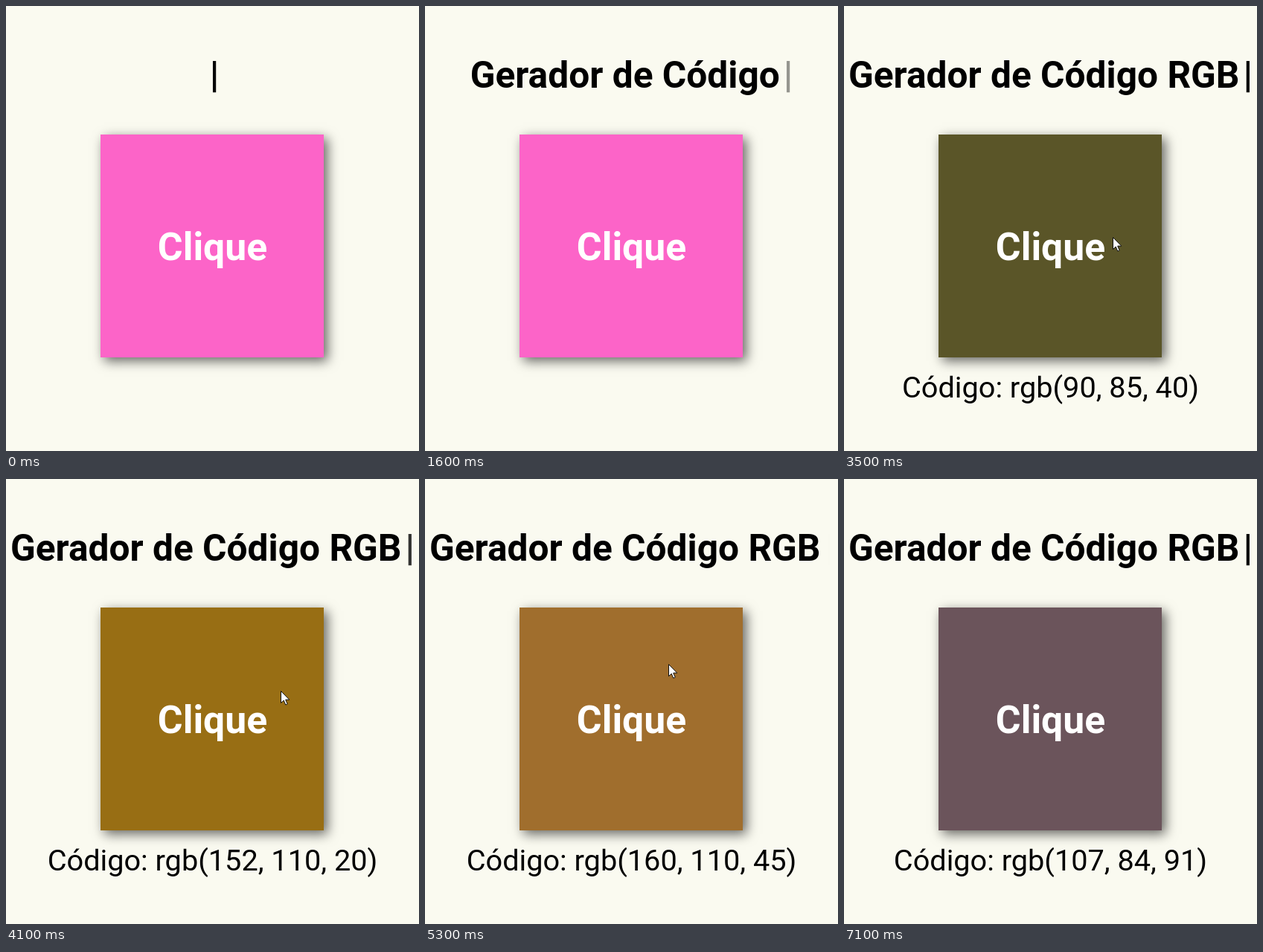
These frames come from a looping animation (555 by 599 pixels, 7.2 s). An HTML page with a canvas:

```html
<!DOCTYPE html>
<html lang="pt">
<head>
<meta charset="utf-8">
<style>
  html, body { margin: 0; width: 100%; height: 100%; overflow: hidden; background: #fafaf0; }
  canvas { display: block; }
</style>
</head>
<body>
<canvas id="stage" width="555" height="599"></canvas>
<script>
const ctx = document.getElementById('stage').getContext('2d');
const LOOP = 7200, MID = 277.5;
const BLINK = 700, TYPE_START = 360, TYPE_STEP = 72;
const FIRST_CLICK = 2500, CLICK_STEP = 500;
const TITLE = 'Gerador de Código RGB';
const FONT = 'px Roboto, sans-serif';

// Every second click shows one of these; the clicks between show the mean of its neighbours.
const COLORS = [[224, 34, 200], [90, 85, 40], [214, 136, 0], [107, 84, 91]];

// The pointer rests at each stop, then glides to the next, one stop per second.
const STOPS = [[-20, 494], [301, 388], [361, 311], [381, 247], [315, 249], [52, -24]];

const clamp = (v, lo, hi) => Math.max(lo, Math.min(hi, v));
const smooth = u => u * u * (3 - 2 * u);

// cubic-bezier(.25, .1, .25, 1), the CSS "ease"
function ease(x) {
  const curve = (s, a, b) => 3 * s * (1 - s) * (1 - s) * a + 3 * s * s * (1 - s) * b + s * s * s;
  let lo = 0, hi = 1;
  for (let i = 0; i < 20; i++) {
    const m = (lo + hi) / 2;
    if (curve(m, .25, .25) < x) lo = m; else hi = m;
  }
  return curve(lo, .1, 1);
}

function caretAlpha(t) {
  const p = 2 * ((t - 80 + BLINK) % BLINK) / BLINK;
  return p < 1 ? 1 - ease(p) : ease(p - 1);
}

function colorAt(t) {
  if (t < FIRST_CLICK) return null;
  const last = COLORS.length - 1;
  const k = Math.min(Math.floor((t - FIRST_CLICK) / CLICK_STEP) / 2, last);
  const a = COLORS[Math.floor(k)], b = COLORS[Math.ceil(k)];
  return `rgb(${a.map((v, i) => Math.floor((v + b[i]) / 2)).join(', ')})`;
}

function text(str, x, y, font, color, align) {
  ctx.font = font;
  ctx.fillStyle = color;
  ctx.textAlign = align;
  ctx.fillText(str, x, y);
}

function drawTitle(t) {
  const font = 'bold 49.6' + FONT;
  const count = clamp(Math.floor((t - TYPE_START) / TYPE_STEP), 0, TITLE.length);
  const typed = TITLE.slice(0, count);
  ctx.font = font;
  const w = ctx.measureText(typed).width + 5;
  const x = MID - (w + ctx.measureText('|').width) / 2;
  text(typed, x, 110, font, '#000', 'left');
  ctx.globalAlpha = caretAlpha(t);
  text('|', x + w, 110, font, '#000', 'left');
  ctx.globalAlpha = 1;
}

function drawSquare(color) {
  ctx.save();
  ctx.shadowColor = 'rgba(0,0,0,.6)';
  ctx.shadowBlur = 15;
  ctx.shadowOffsetX = 5;
  ctx.shadowOffsetY = 5;
  ctx.fillStyle = color;
  ctx.fillRect(127, 173, 300, 300);
  ctx.restore();
  text('Clique', MID, 342, 'bold 51.7' + FONT, '#fff', 'center');
}

function drawPointer(t) {
  const s = clamp((t - FIRST_CLICK) / (2 * CLICK_STEP) + 1, 0, STOPS.length - 1.001);
  const i = Math.floor(s), from = STOPS[i], to = STOPS[i + 1];
  const u = smooth(clamp((s - i - .3) / .69, 0, 1));
  const [x, y] = from.map((v, j) => Math.round(v + (to[j] - v) * u) + .5);
  const arrow = new Path2D('M0 0V16L3.7 12.5L6.3 18.5L8.7 17.4L6.2 11.6H11.3Z');
  ctx.save();
  ctx.translate(x, y);
  ctx.fillStyle = '#fff';
  ctx.strokeStyle = '#111';
  ctx.fill(arrow);
  ctx.stroke(arrow);
  ctx.restore();
}

function draw(t) {
  ctx.fillStyle = '#fafaf0';
  ctx.fillRect(0, 0, 555, 599);
  const rgb = colorAt(t);
  drawTitle(t);
  drawSquare(rgb || '#fc64c8');
  if (rgb) text('Código: ' + rgb, MID, 527, '39.7' + FONT, '#000', 'center');
  drawPointer(t);
}

const start = performance.now();
function tick() {
  draw((performance.now() - start) % LOOP);
  requestAnimationFrame(tick);
}
tick();
</script>
</body>
</html>
```
